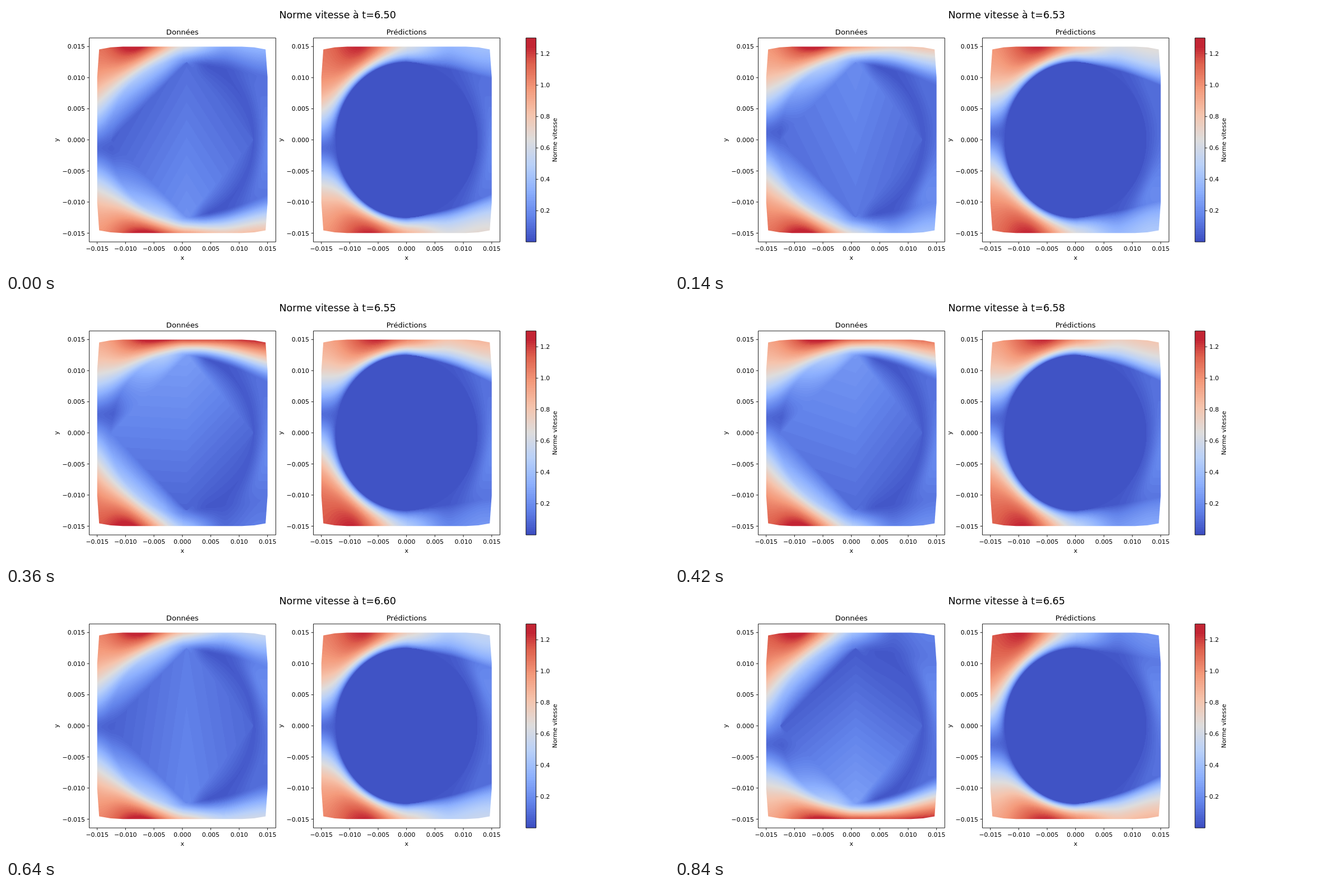
These frames come from a looping animation (1183x473 px, 980 ms). An HTML page with a canvas:

```html
<!DOCTYPE html>
<html lang="fr">
<head>
<meta charset="utf-8">
<title>Norme vitesse</title>
<style>
  html, body { margin: 0; width: 100%; height: 100%; overflow: hidden; background: #fff; }
  canvas, svg { position: absolute; left: 0; top: 0; }
  text { font-family: "DejaVu Sans", sans-serif; font-size: 10.95px; fill: #000; }
  path { fill: none; stroke: #000; stroke-width: .88; }
</style>
</head>
<body>
<canvas id="field" width="1183" height="473"></canvas>
<svg id="chart" width="1183" height="473"></svg>
<script>
const STEP_MS = 140;
const SWING = [-.45, .4, 1, .8, -.05, -.9, -1];      // flow deflection at each time step
const GLOW = [.1, .7, .2, .25, -.5, -.1, -.35];      // height of the faster patch in the wake
const CX = 314.7, CY = 238.9, RX = 126.7, RY = 138.8, PANEL_GAP = 400;
const LEVELS = 100, TOP_LEVEL = 95, VMAX = 1.3;
const COOLWARM = [[59,76,192], [98,131,234], [141,176,254], [184,208,249], [221,221,221],
  [245,196,173], [244,154,123], [222,96,77], [180,4,38]];

const clamp = x => Math.min(1, Math.max(0, x));
const mix = (a, b, t) => a + (b - a) * t;
const smooth = (a, b, x) => { const t = clamp((x - a) / (b - a)); return t * t * (3 - 2 * t); };

const palette = Array.from({ length: LEVELS }, (_, i) => {
  const p = (Math.min(i, TOP_LEVEL) + .5) / LEVELS * 8, k = Math.floor(p);
  return COOLWARM[k].map((c, j) => Math.round(mix(c, COOLWARM[k + 1][j], p - k)));
});
const band = value => palette[Math.floor(clamp(value / VMAX) * (LEVELS - .01))];

// Both panels share one flow; the prediction is sharper at the cylinder and weaker downstream.
const DATA = {
  delta: .26, power: 1.4, slip: .28, spread: .6, peak: 1.26,
  wake: q => .48 + .55 * q + .12 * q * q, crest: q => .78 + .38 * q
};
const PREDICTION = {
  delta: .115, power: 1, slip: 0, spread: 1, peak: 1.21,
  wake: q => .45 + .32 * q, crest: q => .73 + .28 * q
};

function wallSpeed(u, q, model) {
  const peakAt = -.6 + .18 * q, crest = model.crest(q);
  if (u < peakAt) return mix(1 - .12 * q, model.peak, smooth(-1.2, peakAt, u));
  if (u < 0) return mix(model.peak, crest, smooth(peakAt, .1, u) / smooth(peakAt, .1, 0));
  return mix(crest, model.wake(q), smooth(-.1, .65, u));
}

// Speed outside the cylinder, in units of its radius (v points down).
function outerSpeed(u, v, swing, glowAt, model) {
  const stagnation = -.23 * swing, downstream = Math.max(u, 0);
  const side = v < stagnation ? -1 : 1, q = -side * swing;
  const sweep = (.08 + .07 * q) * u * u;
  const radius = h => u < 0 ? Math.hypot(u, h) : Math.abs(h) + sweep;
  const delta = model.delta * (1 - .15 * q) * (1 + model.spread * downstream);
  const slip = model.slip * (1 - smooth(-.3, .4, u));
  const layer = h => {
    const depth = Math.max(0, radius(h) - 1 + .12 * downstream);
    return 1 - (1 - slip) * Math.exp(-Math.pow(depth / delta, model.power));
  };
  const shear = h => Math.tanh(1.9 * Math.hypot(h - stagnation, .07) ** 1.2);
  const stream = wallSpeed(u, q, model) * shear(v) / shear(1.2 * side) * layer(v) / layer(1.2);
  const glow = .15 * smooth(.95, 1.25, Math.hypot(u, v)) * smooth(.5, 1.1, u)
    * (.45 + .55 * Math.exp(-(((v - glowAt) / .5) ** 2)));
  return Math.min(1.29, stream + .035 + glow);
}

// The data have no points inside the cylinder: four vertices are joined linearly.
const diamondWidth = u => u < .06 ? (.06 - u) / 1.06 : (u - .06) / .94;

function diamondSpeed(u, v, q) {
  const w = diamondWidth(u);
  const sideValue = u < .06 ? .06 + .1 * Math.max(q, 0) : .08;
  const top = .15 + .11 * q, bottom = .17 - .1 * q;
  return sideValue * w + top * (1 - w - v) / 2 + bottom * (1 - w + v) / 2;
}

function dataSpeed(u, v, q, glowAt) {
  const r = Math.hypot(u, v);
  if (r >= 1) return outerSpeed(u, v, q, glowAt, DATA);
  const size = (x, y) => diamondWidth(x) + Math.abs(y);
  const m = size(u, v);
  if (m <= 1) return diamondSpeed(u, v, q);
  const chord = diamondSpeed(.06 + (u - .06) / m, v / m, q);
  const arc = outerSpeed(u / r, v / r, q, glowAt, DATA);
  return mix(chord, arc, clamp((m - 1) / (size(u / r, v / r) - 1)));
}

function predictedSpeed(u, v, q, glowAt) {
  return Math.hypot(u, v) < 1 ? .015 : outerSpeed(u, v, q, glowAt, PREDICTION);
}

function renderPanel(speed, q, glowAt) {
  const tile = document.createElement("canvas");
  tile.width = 306; tile.height = 335;
  const g = tile.getContext("2d"), image = g.createImageData(tile.width, tile.height);
  for (let y = 0, i = 0; y < tile.height; y++)
    for (let x = 0; x < tile.width; x++, i += 4) {
      const u = (162.5 + x - CX) / RX, v = (72.5 + y - CY) / RY;
      image.data.set(band(speed(u, v, q, glowAt)), i);
      image.data[i + 3] = 255;
    }
  g.putImageData(image, 0, 0);
  return tile;
}

const ctx = document.getElementById("field").getContext("2d");
const steps = SWING.map((q, i) => [dataSpeed, predictedSpeed].map(f => renderPanel(f, q, GLOW[i])));

// Outline of the sampled domain: one rounded corner mirrored to all four.
function domainPath() {
  const corner = [[152, 112], [148.5, 161.5], [128, 165.2], [106, 166.3]];
  const path = new Path2D();
  for (const [sx, sy] of [[1, 1], [-1, 1], [-1, -1], [1, -1]]) {
    const points = sx * sy > 0 ? corner : [...corner].reverse();
    for (const [x, y] of points) path.lineTo(CX + sx * x, CY + sy * y);
  }
  path.closePath();
  return path;
}
const domain = domainPath();

function drawFields(step) {
  ctx.clearRect(0, 0, 900, 473);
  steps[step].forEach((tile, panel) => {
    ctx.save();
    ctx.translate(panel * PANEL_GAP, 0);
    ctx.clip(domain);
    ctx.drawImage(tile, 162, 72);
    ctx.restore();
  });
}

const chart = document.getElementById("chart");
function add(tag, attributes, content = "") {
  const node = document.createElementNS("http://www.w3.org/2000/svg", tag);
  for (const key in attributes) node.setAttribute(key, attributes[key]);
  node.textContent = content;
  return chart.appendChild(node);
}
const label = (content, x, y, anchor = "middle", size = 10.95) =>
  add("text", { x, y, "text-anchor": anchor, style: `font-size:${size}px` }, content);
const verticalLabel = (content, x, y) =>
  add("text", { transform: `translate(${x} ${y}) rotate(-90)`, "text-anchor": "middle" }, content);
const line = d => add("path", { d });

["Données", "Prédictions"].forEach((title, panel) => {
  const dx = panel * PANEL_GAP;
  line(`M${148.5 + dx} 57H${481.4 + dx}V421.1H${148.5 + dx}Z`);
  label(title, CX + dx, 50.6, "middle", 13.14);
  label("x", CX + dx, 453);
  verticalLabel("y", 93.8 + dx, 239);
  for (let i = -3; i <= 3; i++) {
    const value = (i * .005).toFixed(3).replace("-", "\u2212");
    const x = CX + dx + i * 50.68, y = CY - i * 55.52;
    line(`M${x} 421.1v3.83M${148.5 + dx} ${y}h-3.83`);
    label(value, x, 437);
    label(value, 141 + dx, y + 4.1, "end");
  }
});

const barHeight = 364.1 / LEVELS;
palette.forEach((color, i) => {
  ctx.fillStyle = `rgb(${color})`;
  const top = Math.round(421.1 - (i + 1) * barHeight);
  ctx.fillRect(928, top, 18, Math.round(421.1 - i * barHeight) - top);
});
line("M927.8 57H945.8V421.1H927.8Z");
for (let i = 1; i <= 6; i++) {
  const y = 421.4 - i * 56.02;
  line(`M945.8 ${y}h3.83`);
  label((i * .2).toFixed(1), 953.2, y + 4.1, "start");
}
verticalLabel("Norme vitesse", 983.4, 239.2);
const heading = label("", 591.7, 22, "middle", 17.53);

let shown = -1;
function tick() {
  const step = Math.floor(performance.now() / STEP_MS) % SWING.length;
  if (step !== shown) {
    shown = step;
    drawFields(step);
    heading.textContent = `Norme vitesse à t=${(Math.round(650 + 2.5 * step) / 100).toFixed(2)}`;
  }
  requestAnimationFrame(tick);
}
tick();
</script>
</body>
</html>
```
